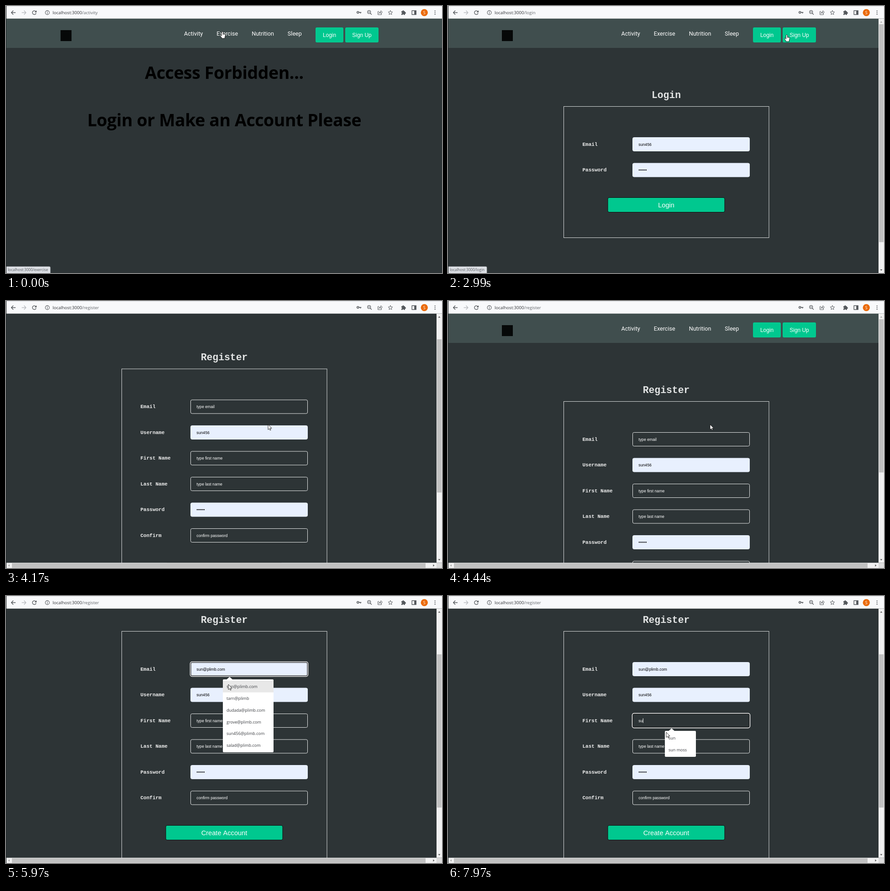
Recreate the animation shown at these times as an HTML page with a canvas. Size 955 by 586 pixels, loop 8 s.

```html
<!DOCTYPE html>
<html lang="en">
<head>
<meta charset="utf-8">
<title>Register</title>
<style>
html, body { margin: 0; width: 100%; height: 100%; overflow: hidden; background: #2d3436; }
canvas { display: block; width: 955px; height: 586px; }
</style>
</head>
<body>
<canvas id="stage" width="955" height="586"></canvas>
<script>
const c = document.getElementById('stage').getContext('2d');
const LOOP = 8000, NOTCH = 71.5, ROW = 56.5, FIRST_ROW = 303.5;
const BG = '#2d3436', NAV = '#404e4e', GREEN = '#00c88f', FILLED = '#e8f0fe';
const BAR = '#f8f9fb', ICON = '#54585c', DIM = '#a3a3a3';
const UI = '"Open Sans", "Noto Sans", sans-serif';
const ARIAL = '"Liberation Sans", Arial, sans-serif';
const MONO = '"Liberation Mono", monospace';

const EMAILS = ['sun@plimb.com', 'tarn@plimb', 'dudada@plimb.com', 'grove@plimb.com', 'sun456@plimb.com', 'salad@plimb.com'];
const NAMES = ['sun', 'sun moss', 'sunny side of pond'];
const USER = 'sun456';

// When each link is first hovered and when its page opens
const ROUTES = [
  { path: 'activity', hover: 0, open: 0 },
  { path: 'exercise', hover: 0, open: 180 },
  { path: 'nutrition', hover: 360, open: 720 },
  { path: 'sleep', hover: 1080, open: 1260 },
  { path: 'login', hover: 1800, open: 2440 },
  { path: 'register', hover: 3080, open: 3350 }
];
const WIDE_LAYOUT = 3170;
const EMAIL_FOCUS = 5430, EMAIL_PREVIEW = 5790, EMAIL_PICK = 6150, NAME_FOCUS = 7240, TYPE = 7700, KEY_GAP = 180;

// Pointer glides: start, duration, x, y
const GLIDES = [
  [180, 270, 566, 57], [810, 360, 641, 61], [1630, 180, 718, 78], [2080, 270, 712, 62],
  [2800, 370, 769, 64], [3540, 450, 574, 271], [4530, 450, 483, 208], [5200, 200, 484, 168],
  [5600, 280, 487, 194], [6150, 720, 461, 268], [7240, 180, 478, 299]
];
// Wheel notches: start, direction
const WHEEL = [[3954, 1], [4200, -1], [4500, 1], [4620, 1], [4740, 1], [5230, -1]];

const HAND = new Path2D('M-1.5 1Q0-1.2 1.5 1V5L5 5.8Q6.7 6.4 6.5 8.3L5.4 13V15H-1.7V13.4L-5 9Q-5.4 7 -3.7 7.4L-1.5 9.3Z');
const ARROW = new Path2D('M0 0V11.4L2.7 9 4.4 12.8 6.2 12 4.5 8.3H8Z');

const ease = x => { x = Math.min(Math.max(x, 0), 1); return x * x * (3 - 2 * x); };
const latest = (key, t) => ROUTES.filter(r => r[key] <= t).pop().path;
const scrollAt = t => WHEEL.reduce((y, [start, dir]) => y + dir * NOTCH * ease((t - start) / 200), 0);
const pointerAt = t => GLIDES.reduce((p, [start, time, x, y]) => {
  const k = ease((t - start) / time);
  return { x: p.x + (x - p.x) * k, y: p.y + (y - p.y) * k };
}, { x: 474, y: 56 });

function rect(x, y, w, h, color) {
  c.fillStyle = color;
  c.fillRect(x, y, w, h);
}

function round(x, y, w, h, r, fill, stroke, width = 1) {
  c.beginPath();
  c.roundRect(x, y, w, h, r);
  if (fill) { c.fillStyle = fill; c.fill(); }
  if (stroke) { c.strokeStyle = stroke; c.lineWidth = width; c.stroke(); }
}

function text(s, x, y, font, color, align = 'left') {
  c.font = font;
  c.fillStyle = color;
  c.textAlign = align;
  c.fillText(s, x, y);
  return c.measureText(s).width;
}

function line(d, color = ICON, width = 1.3) {
  c.strokeStyle = color;
  c.lineWidth = width;
  c.stroke(new Path2D(d));
}

function shape(d, color = ICON) {
  c.fillStyle = color;
  c.fill(new Path2D(d));
}

function disc(x, y, r, color = ICON) {
  c.beginPath();
  c.arc(x, y, r, 0, 7);
  c.fillStyle = color;
  c.fill();
}

function ring(x, y, r, width = 1.2, from = 0, to = 7) {
  c.beginPath();
  c.arc(x, y, r, from, to);
  c.strokeStyle = ICON;
  c.lineWidth = width;
  c.stroke();
}

// Small triangle pointing along angle a
function tip(x, y, a, color) {
  c.save();
  c.translate(x, y);
  c.rotate(a);
  shape('M-1.5 -2.5L1.5 0 -1.5 2.5Z', color);
  c.restore();
}

function star(x, y) {
  c.beginPath();
  for (let i = 0; i < 10; i++) {
    const r = i % 2 ? 2.3 : 5, a = (i - 2.5) * Math.PI / 5;
    c.lineTo(x + r * Math.cos(a), y + r * Math.sin(a));
  }
  c.closePath();
  c.strokeStyle = ICON;
  c.lineWidth = 1;
  c.stroke();
}

function toolbar(t) {
  rect(0, 0, 955, 27, BAR);
  rect(0, 0, 955, 1, '#dfe1e5');
  rect(0, 27, 955, 1, '#b9bdbf');
  line('M21 14.5H12M16 10L11.7 14.5 16 19', ICON, 1.4);
  line('M34.5 14.5H43.5M39.5 10L43.8 14.5 39.5 19', '#b9bcc0');
  ring(62, 14.5, 4.1, 1.4, 0.3, 5.5);
  shape('M67 9.6V14H62.6Z');
  ring(90.5, 14.5, 4.4, 1.1);
  line('M90.5 11.8V13M90.5 13.8V17.1', ICON, 1.1);
  const font = '9.55px ' + UI;
  const w = text('localhost:3000', 102, 18, font, '#303236');
  text('/' + latest('open', t), 102 + w, 18, font, '#63676b');

  ring(770.8, 14, 2, 1.6);
  line('M773 14H778.3M776.5 14V16.3', ICON, 1.7);
  ring(795.3, 13.3, 3.4);
  line('M797.8 15.8L801 19M793.5 13.3H797');
  line('M817 12H814.7V19H822.5V16.5M816.8 16.3Q817.5 12.8 821 12.5V10.3L824.5 13.6 821 16.4V14.5Q818.5 14.3 816.8 16.3Z', ICON, 1);
  star(842, 14.7);
  rect(866, 11.5, 8, 8, ICON);
  disc(870, 11.3, 1.7);
  disc(874.3, 15.3, 1.7);
  disc(866.2, 15.5, 1.3, BAR);
  disc(870, 19.5, 1.3, BAR);
  line('M889.2 10.2H898.2V18.8H889.2Z', ICON, 1.4);
  rect(894.2, 10, 4.2, 9, ICON);
  disc(916.3, 14.5, 7.7, '#ea6a0a');
  text('S', 916.3, 17.8, '9px ' + UI, '#fff', 'center');
  for (let i = -1; i <= 1; i++) disc(939.7, 14.5 + 3.7 * i, 1.1);
}

function navButton(x, w, label) {
  round(x, 47, w, 33, 3, GREEN);
  text(label, x + w / 2, 68, '11.9px ' + ARIAL, '#fff', 'center');
}

function navbar(right) {
  rect(0, 28, 955, 64, NAV);
  rect(right > 943 ? 119.5 : 118, 53, 24, 24, '#060808');
  const shift = right > 943 ? 0 : -10.5;
  let x = 390 + shift;
  for (const s of ['Activity', 'Exercise', 'Nutrition', 'Sleep'])
    x += 30 + text(s, x, 65, '12.6px Roboto, sans-serif', '#fff');
  navButton(Math.round(678 + shift), 61, 'Login');
  navButton(Math.round(743 + shift), 73, 'Sign Up');
}

function forbiddenPage() {
  navbar(955);
  c.letterSpacing = '-0.4px';
  ['Access Forbidden...', 'Login or Make an Account Please'].forEach((s, i) =>
    text(s, 478, 160 + 103.5 * i, 'bold 37.4px ' + UI, '#000', 'center'));
  c.letterSpacing = '0px';
}

function field(y, { label, hint, value = '', secret, plain, focus, caret }) {
  text(label, 294.5, y + 3.4, 'bold 11px ' + MONO, '#eee');
  const filled = value && !plain, ink = filled ? '#000' : '#fff';
  round(404.5, y - 15, 256, 30, 3, filled ? FILLED : BG, filled ? FILLED : '#e6e8e8');
  if (focus) {
    round(404.8, y - 14.7, 255.4, 29.4, 2.5, null, '#101010', 1.4);
    round(403.5, y - 16, 258, 32, 4, null, '#fff', 1.4);
  }
  if (secret) {
    for (let i = 0; i < 6; i++) disc(418.8 + i * 3.03, y, 1.15, ink);
    return;
  }
  const w = text(value || hint, 417.3, y + 3.2, '8.7px ' + ARIAL, ink);
  if (caret) rect(417.6 + (value ? w : 0), y - 5, 1, 10, ink);
}

function form(title, rows, action) {
  const end = FIRST_ROW + ROW * (rows.length - 1);
  navbar(943);
  text(title, 478, 201.7, 'bold 21.4px ' + MONO, '#e2e4e4', 'center');
  c.strokeStyle = '#d9dcdc';
  c.lineWidth = 1;
  c.strokeRect(253.5, 220.5, 449.5, end - 72);
  rows.forEach((row, i) => field(FIRST_ROW + ROW * i, row));
  round(350, end + 60.5, 256, 32, 3, GREEN, '#0b0e0e');
  text(action, 478, end + 81.8, '14.6px ' + ARIAL, '#fff', 'center');
}

const password = { label: 'Password', value: '*', secret: true };

function loginPage() {
  form('Login', [{ label: 'Email', value: USER }, password], 'Login');
}

function registerPage(t) {
  const onName = t >= NAME_FOCUS, onEmail = t >= EMAIL_FOCUS && !onName;
  const typed = NAMES[0].slice(0, t < TYPE ? 0 : Math.min(2, 1 + Math.floor((t - TYPE) / KEY_GAP)));
  form('Register', [
    { label: 'Email', hint: 'type email', value: t >= EMAIL_PREVIEW ? EMAILS[0] : '',
      focus: onEmail, caret: onEmail && t >= EMAIL_PICK && (t - EMAIL_PICK) % 1000 < 500 },
    { label: 'Username', value: USER },
    { label: 'First Name', hint: 'type first name', value: typed, plain: true, focus: onName, caret: onName },
    { label: 'Last Name', hint: 'type last name' },
    password,
    { label: 'Confirm', hint: 'confirm password' }
  ], 'Create Account');
}

function dropdown(row, w, items, lit) {
  const y = row + 22.5, gap = 25.75;
  round(475, y, w, 5.5 + gap * items.length, 2, '#fff');
  shape(`M483 ${y + 0.5}l6.7 -6 6.8 6Z`, '#fff');
  if (lit) rect(475, y + 3, w, 25.5, '#e8e8e8');
  items.forEach((s, i) => text(s, 483, y + 19.3 + gap * i, '9px ' + UI, '#3a3c40'));
}

function suggestions(t, scroll) {
  const email = FIRST_ROW - scroll, name = email + 2 * ROW;
  if (t >= EMAIL_FOCUS && t < EMAIL_PICK) dropdown(email, 111, EMAILS, t >= EMAIL_PREVIEW);
  if (t >= TYPE + KEY_GAP) dropdown(name, 68, NAMES.slice(0, 2));
  else if (t >= NAME_FOCUS + 90) dropdown(name, 120, NAMES);
}

function scrollbars(both, scroll) {
  const bottom = both ? 574.5 : 586, view = bottom - 28, track = view - 24;
  const content = both ? 849 : 623, down = Math.PI / 2;
  rect(943, 28, 12, view, '#f1f1f1');
  rect(944, 40 + scroll * track / content, 10, track * view / content, '#c1c1c1');
  tip(949, 35, -down, scroll ? '#555' : DIM);
  tip(949, bottom - 6.5, down, '#555');
  if (!both) return;
  rect(0, bottom, 943, 11.5, '#f1f1f1');
  rect(13, bottom + 1, 906, 10, '#c1c1c1');
  rect(943, bottom, 12, 11.5, '#dcdcdc');
  tip(6.3, 580.5, Math.PI, DIM);
  tip(937, 580.5, 0, '#555');
}

function statusBubble(t) {
  const s = 'localhost:3000/' + latest('hover', t), font = '8.1px ' + UI;
  c.globalAlpha = 1 - ease((t - 3870) / 300);
  c.font = font;
  round(-3, 572, c.measureText(s).width + 12, 17, 2, '#dee1e6', '#b6babf', 0.8);
  text(s, 4, 582.3, font, '#55595e');
  c.globalAlpha = 1;
}

function pointer(t, scroll) {
  const { x, y } = pointerAt(t);
  const row = (y + scroll - FIRST_ROW + 15) / ROW;
  const listOpen = t >= EMAIL_FOCUS && t < EMAIL_PICK && y > 183;
  const overField = x > 404 && x < 661 && row > 0 && row % 1 < 30 / ROW && !listOpen;
  c.save();
  c.translate(x, y);
  if (t > ROUTES[5].open && overField) {
    c.globalCompositeOperation = 'difference';
    line('M-2.5 -5.5H-.5M.5 -5.5H2.5M0 -5V5M-2.5 5.5H-.5M.5 5.5H2.5', '#e0e0e0', 1);
  } else {
    const hand = y < 85, path = hand ? HAND : ARROW;
    c.fillStyle = '#fff';
    c.strokeStyle = '#000';
    c.lineWidth = 0.8;
    c.fill(path);
    c.stroke(path);
    if (hand) line('M1.5 5V7.5M3.3 5.6V7.8', '#000', 0.5);
  }
  c.restore();
}

function draw(t) {
  const scroll = scrollAt(t);
  rect(0, 0, 955, 586, BG);
  c.save();
  c.translate(0, -scroll);
  if (t < ROUTES[4].open) forbiddenPage();
  else if (t < ROUTES[5].open) loginPage();
  else registerPage(t);
  c.restore();
  suggestions(t, scroll);
  if (t >= ROUTES[4].open) scrollbars(t >= WIDE_LAYOUT, scroll);
  statusBubble(t);
  toolbar(t);
  rect(0, 0, 1, 586, '#1f2527');
  pointer(t, scroll);
}

const begin = performance.now();
function tick() {
  draw((performance.now() - begin) % LOOP);
  requestAnimationFrame(tick);
}
tick();
</script>
</body>
</html>
```
